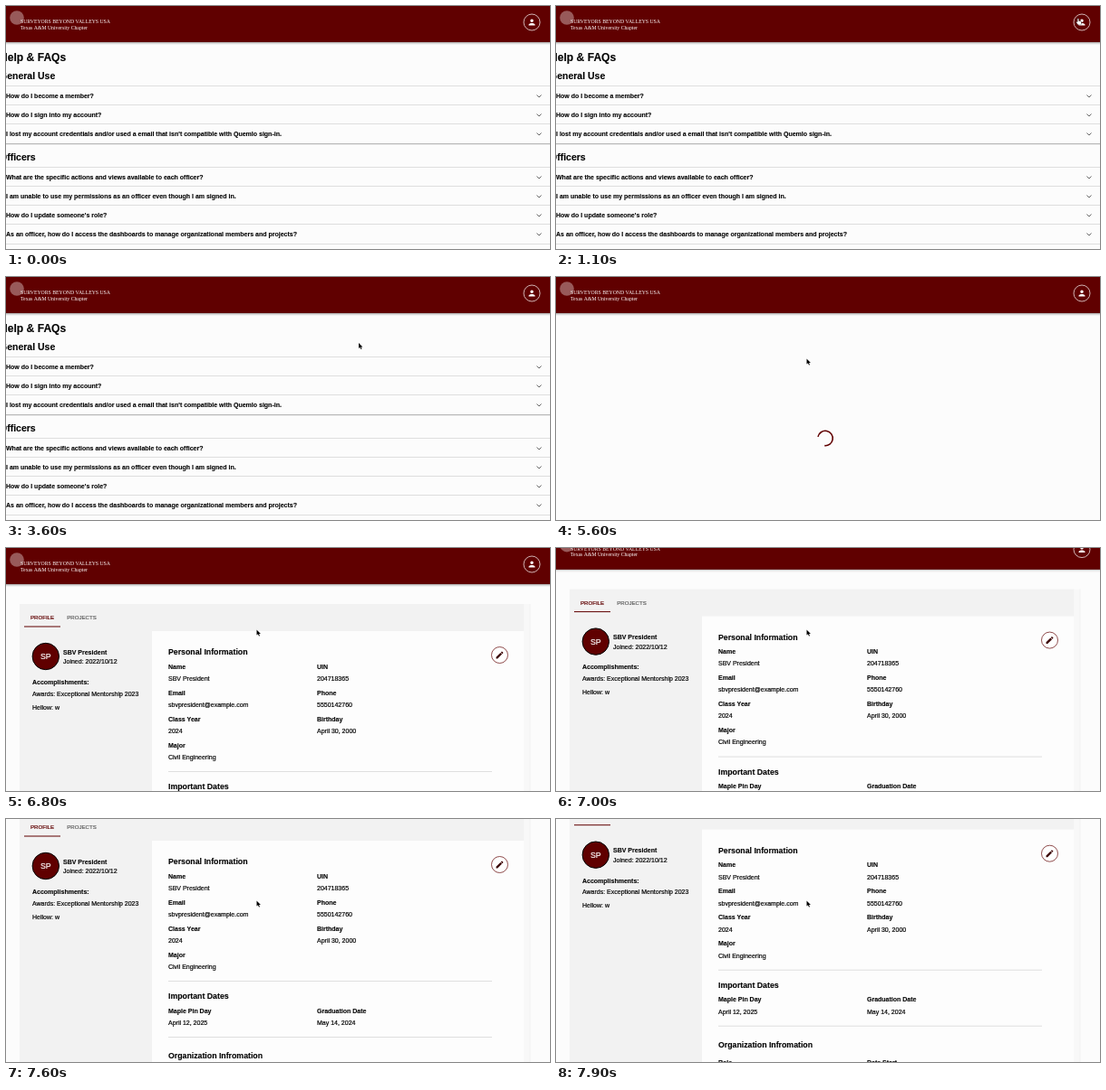
Recreate the animation shown at these times as an HTML page with a canvas. Size 600 px wide and 269 px high, loop 8 s.

```html
<!DOCTYPE html>
<html lang="en">
<head>
<meta charset="utf-8">
<title>Help and profile walkthrough</title>
<style>
html, body { margin: 0; width: 100%; height: 100%; overflow: hidden; background: #fcfcfc; }
canvas { display: block; width: 600px; height: 269px; }
</style>
</head>
<body>
<canvas id="stage"></canvas>
<script>
const W = 600, H = 269, LOOP = 8000;
const MAROON = '#600000', INK = '#050505', PAGE = '#fcfcfc', PANEL = '#f2f2f2';
const SANS = '"Liberation Sans", Arial, sans-serif';
const SERIF = '"Liberation Serif", Times, serif';
const ICON = 0.4375;

const canvas = document.getElementById('stage');
const ctx = canvas.getContext('2d');
const dpr = window.devicePixelRatio || 1;
canvas.width = W * dpr;
canvas.height = H * dpr;

const icons = {
  home: new Path2D('M10 20v-6h4v6h5v-8h3L12 3 2 12h3v8z'),
  person: new Path2D('M12 12a4 4 0 1 0 0-8a4 4 0 0 0 0 8m0 2c-2.67 0-8 1.34-8 4v2h16v-2c0-2.66-5.33-4-8-4z'),
  hammer: new Path2D('M18 3l-3 3V3H9C6.24 3 4 5.24 4 8h5v3h6V8l3 3h2V3zM9 13v8h6v-8z'),
  group: new Path2D('M16 11a3 3 0 1 0 0-6a3 3 0 0 0 0 6M8 11a3 3 0 1 0 0-6a3 3 0 0 0 0 6m0 2c-2.33 0-7 1.17-7 3.5V19h14v-2.5c0-2.33-4.67-3.5-7-3.5m8 0l-1 .05c1.2.84 2 1.97 2 3.45V19h6v-2.5c0-2.33-4.67-3.5-7-3.5'),
  help: new Path2D('M12 2a10 10 0 1 0 0 20a10 10 0 0 0 0-20z'),
  exit: new Path2D('M17 7l-1.41 1.41L18.17 11H8v2h10.17l-2.58 2.58L17 17l5-5zM4 5h8V3H4c-1.1 0-2 .9-2 2v14c0 1.1.9 2 2 2h8v-2H4z'),
  pencil: new Path2D('M3 17.25V21h3.75L17.81 9.94l-3.75-3.75zM20.71 7.04c.39-.39.39-1.02 0-1.41l-2.34-2.34a1 1 0 0 0-1.41 0l-1.83 1.83 3.75 3.75z')
};
const arrow = new Path2D('M0 0v7.2l1.7-1.6 1.2 2.7 1.2-.5-1.2-2.6h2.3z');
const hand = new Path2D('M-.8 .2q.8-.8 1.4 0v2.6l2.6.7q.8.3.7 1.2l-.5 3.1h-3.6l-2.3-3q0-.9.9-.6l.8.6z');

const menuItems = [
  ['home', 'Home'], ['person', 'Profile'], ['hammer', 'Projects'],
  ['group', 'Members'], ['help', 'Help'], ['exit', 'Sign Out']
];
const faqs = [
  [99, 'How do I become a member?'],
  [120, 'How do I sign into my account?'],
  [141, "I lost my account credentials and/or used a email that isn't compatible with Quemlo sign-in."],
  [189, 'What are the specific actions and views available to each officer?'],
  [210, 'I am unable to use my permissions as an officer even though I am signed in.'],
  [231, "How do I update someone's role?"],
  [252, 'As an officer, how do I access the dashboards to manage organizational members and projects?']
];
const fields = [
  [179, 131, 'Name', 'SBV President'], [343, 131, 'UIN', '204718365'],
  [179, 160, 'Email', 'sbvpresident@example.com'], [343, 160, 'Phone', '5550142760'],
  [179, 189, 'Class Year', '2024'], [343, 189, 'Birthday', 'April 30, 2000'],
  [179, 218, 'Major', 'Civil Engineering'],
  [179, 280, 'Maple Pin Day', 'April 12, 2025'], [343, 280, 'Graduation Date', 'May 14, 2024'],
  [179, 350, 'Role', ''], [343, 350, 'Date Start', '']
];

// [time, x, y]
const pointerPath = [
  [100, 596, 60], [500, 585, 30], [800, 577, 14], [1000, 577, 14], [1100, 576, 14],
  [1400, 576, 14], [1900, 571, 40], [2200, 565, 55], [2300, 562, 55], [2550, 562, 55],
  [3400, 392, 72], [3500, 392, 72], [3600, 389, 73], [3800, 350, 73], [3900, 350, 73],
  [4200, 276.5, 90.5]
];
const scrollPath = [[6800, 0], [6900, 7], [7300, 44.7], [7600, 68], [7900, 80.3], [8000, 83]];

// [offset, blur, opacity]
const barShadow = [[0.9, 1.75, 0.2], [1.75, 2.2, 0.14], [0.44, 4.4, 0.12]];
const menuShadow = [[2.2, 2.2, 0.2], [3.5, 4.4, 0.14], [1.3, 6.1, 0.12]];

const clamp = v => Math.max(0, Math.min(1, v));
const smooth = v => { v = clamp(v); return v * v * (3 - 2 * v); };

function along(path, t) {
  if (t <= path[0][0]) return path[0].slice(1);
  for (let i = 1; i < path.length; i++) {
    const a = path[i - 1], b = path[i];
    if (t < b[0]) {
      const k = (t - a[0]) / (b[0] - a[0]);
      return a.slice(1).map((v, j) => v + (b[j + 1] - v) * k);
    }
  }
  return path[path.length - 1].slice(1);
}

// y is the middle of the capital letters; a hairline stroke gives sans text its weight
function text(str, x, y, { size = 7, bold = false, color = INK, family = SANS, align = 'left' } = {}) {
  const base = y + size * 0.36;
  ctx.font = `${bold ? 'bold ' : ''}${size}px ${family}`;
  ctx.fillStyle = ctx.strokeStyle = color;
  ctx.textAlign = align;
  ctx.fillText(str, x, base);
  if (family === SERIF) return;
  ctx.lineJoin = 'round';
  ctx.lineWidth = bold ? 0.12 : 0.2;
  ctx.strokeText(str, x, base);
}

function box(x, y, w, h, color) {
  ctx.fillStyle = color;
  ctx.fillRect(x, y, w, h);
}

function raised(x, y, w, h, radius, color, shadows) {
  ctx.save();
  ctx.fillStyle = color;
  ctx.beginPath();
  ctx.roundRect(x, y, w, h, radius);
  for (const [offset, blur, opacity] of shadows) {
    ctx.shadowColor = `rgba(0,0,0,${opacity})`;
    ctx.shadowBlur = blur * dpr;
    ctx.shadowOffsetY = offset * dpr;
    ctx.fill();
  }
  ctx.restore();
}

function disc(x, y, r, fill, stroke, width = 1) {
  ctx.beginPath();
  ctx.arc(x, y, r, 0, Math.PI * 2);
  if (fill) { ctx.fillStyle = fill; ctx.fill(); }
  if (stroke) { ctx.strokeStyle = stroke; ctx.lineWidth = width; ctx.stroke(); }
}

function icon(name, x, y, color, scale = ICON) {
  ctx.save();
  ctx.translate(x, y);
  ctx.scale(scale, scale);
  ctx.translate(-12, -12);
  ctx.fillStyle = color;
  ctx.fill(icons[name]);
  ctx.restore();
  if (name === 'help') text('?', x, y, { bold: true, color: '#fff', align: 'center' });
}

function header() {
  raised(-10, -10, W + 20, 50, 0, MAROON, barShadow);
  disc(12, 13, 7.8, '#985a5a');
  const style = { size: 5.75, color: '#fff', family: SERIF };
  text('SURVEYORS BEYOND VALLEYS USA', 16, 17, style);
  text('Texas A&M University Chapter', 16, 23.5, style);
  disc(580, 18, 9, null, '#fff', 0.7);
  icon('person', 580, 18, '#fff');
}

function chevron(x, y) {
  ctx.beginPath();
  ctx.moveTo(x - 2.5, y - 1);
  ctx.lineTo(x, y + 1.5);
  ctx.lineTo(x + 2.5, y - 1);
  ctx.strokeStyle = '#555';
  ctx.lineWidth = 0.9;
  ctx.stroke();
}

function helpPage() {
  text('Help & FAQs', -7, 57, { size: 12.1, bold: true });
  text('General Use', -7, 77, { size: 10.5, bold: true });
  text('Officers', -7, 167.5, { size: 10.5, bold: true });
  for (const y of [88, 109, 130, 178, 199, 220, 241, 263]) box(0, y, W, 1, '#dedede');
  box(0, 152, W, 1, '#b8b8b8');
  box(0, 153, W, 1, '#ececec');
  for (const [y, label] of faqs) {
    text(label, 0, y, { bold: true });
    chevron(588, y + 0.5);
  }
}

function spinner(t) {
  const p = ((t - 5012 + 1400) % 1400) / 1400;
  const grow = smooth(p * 2), shrink = smooth(p * 2 - 1);
  const unit = 360 / 126.9;
  const from = (15 * grow + 110 * shrink) * unit;
  const to = Math.min(360, from + (1 + 99 * grow) * unit);
  const rad = a => (a + p * 360) * Math.PI / 180;
  ctx.beginPath();
  ctx.arc(297, 178.5, 8.2, rad(from), rad(to));
  ctx.strokeStyle = MAROON;
  ctx.lineWidth = 1.6;
  ctx.stroke();
}

function profilePage() {
  box(15, 62, 556.5, 400, PANEL);
  box(161, 92, 410.5, 400, '#fdfdfd');
  box(571.5, 62, 6.5, 400, '#f8f8f8');
  box(577.5, 62, 1, 400, '#f2f2f2');
  text('PROFILE', 27, 77, { size: 6.1, color: MAROON });
  text('PROJECTS', 67.3, 77, { size: 6.1, color: '#606060' });
  box(20, 86.5, 40, 1, MAROON);

  disc(43.8, 120, 14.7, MAROON, '#000', 1);
  text('SP', 43.8, 120, { size: 8.75, color: '#fff', align: 'center' });
  text('SBV President', 63, 115, { bold: true });
  text('Joined: 2022/10/12', 63, 125.7);
  text('Accomplishments:', 29, 148.3, { bold: true });
  text('Awards: Exceptional Mentorship 2023', 29, 161);
  text('Hellow: w', 29, 176);

  const title = { size: 8.75, bold: true };
  text('Personal Information', 179, 115, title);
  text('Important Dates', 179, 264, title);
  text('Organization Infromation', 179, 330, title);
  for (const [x, y, label, value] of fields) {
    text(label, x, y, { bold: true });
    text(value, x, y + 13.3);
  }
  for (const y of [247, 309]) box(179, y, 357, 1, '#dfdfdf');
  disc(544.5, 118.5, 9, '#fff', MAROON, 0.7);
  icon('pencil', 544.5, 118.5, '#3a0000');
}

function menu(t) {
  const open = smooth((t - 1380) / 200), close = smooth((t - 2600) / 220);
  const alpha = open * (1 - close);
  if (!alpha) return;
  const sx = 0.75 + 0.25 * open, sy = 0.5625 + 0.4375 * open;
  ctx.save();
  ctx.globalAlpha = alpha;
  ctx.translate(580, 30);
  ctx.scale(sx, sy);
  ctx.translate(-580, -30);
  raised(538, 29.5, 56, 102, 2, '#fff', menuShadow);
  const hover = t < 2080 ? 0 : 1;
  box(538, 33.2 + hover * 15.75, 56, 15.75, '#f4f4f4');
  menuItems.forEach(([name, label], i) => {
    const y = 41 + i * 15.75;
    icon(name, 550.3, y, INK);
    text(label, 558, y);
  });
  ctx.restore();
}

function pointer(t) {
  if (t < 100) return;
  const [x, y] = along(pointerPath, t);
  const onLink = t > 700 && t < 2700;
  const shape = onLink ? hand : arrow;
  ctx.save();
  ctx.translate(x, y);
  ctx.scale(0.85, 0.85);
  ctx.lineJoin = 'round';
  ctx.lineWidth = 0.9;
  ctx.strokeStyle = onLink ? '#000' : '#fff';
  ctx.fillStyle = onLink ? '#fff' : '#000';
  ctx.stroke(shape);
  ctx.fill(shape);
  ctx.restore();
}

function draw(now) {
  const t = now % LOOP;
  ctx.setTransform(dpr, 0, 0, dpr, 0, 0);
  box(0, 0, W, H, PAGE);
  ctx.save();
  ctx.translate(0, -along(scrollPath, t)[0]);
  if (t < 5000) helpPage();
  else if (t < 6050) spinner(t);
  else profilePage();
  header();
  ctx.restore();
  menu(t);
  pointer(t);
}

let start = null;
function tick(now) {
  if (start === null) start = now;
  draw(now - start);
  requestAnimationFrame(tick);
}
requestAnimationFrame(tick);
</script>
</body>
</html>
```
